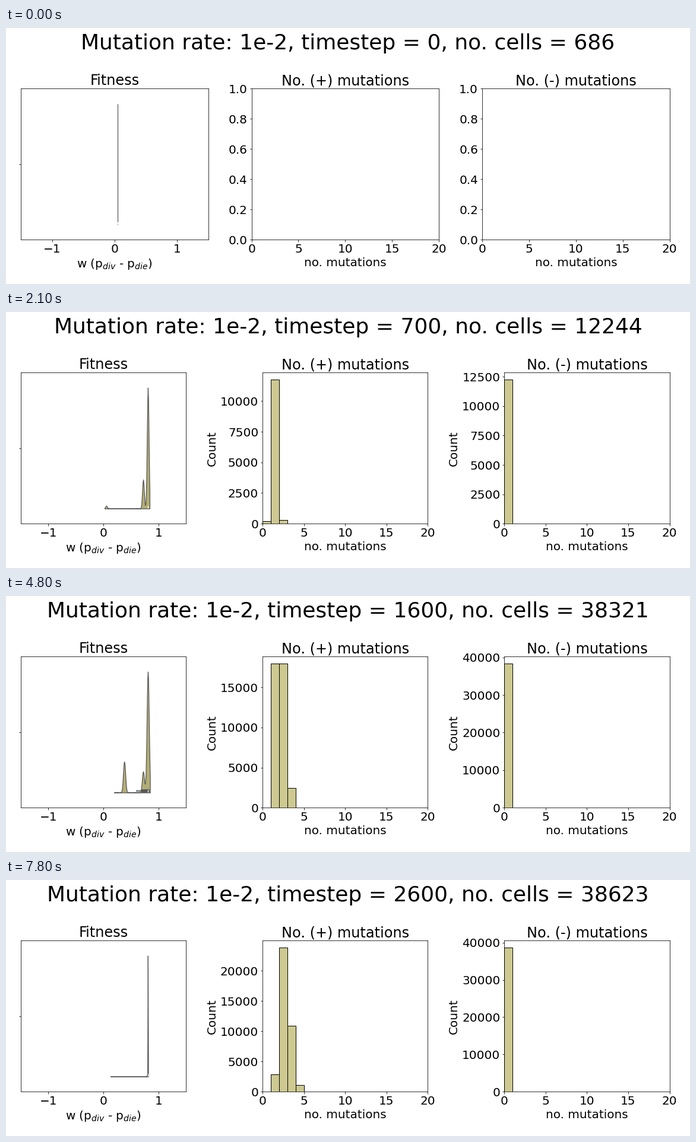
Animation of 1152x432 px, one loop 8 s. Source, as a matplotlib script:

```python
import numpy as np
import matplotlib.pyplot as plt
from matplotlib.animation import FuncAnimation

W, H, DPI = 1152, 432, 72
STEPS = 27
KHAKI, BODY, GRAY = (189 / 255, 183 / 255, 107 / 255, 0.75), "#b3ae75", "#595959"
LINE, BASE = 1.25, 0.4

plt.rcParams.update({"font.family": "DejaVu Sans", "font.size": 20})

WILD, BEST = 0.05, 0.806
FULL = 1900     # step at which the space is full and selection slows down
VISIBLE = 0.02  # smallest share at which a new mutation counts

# logistic takeover by cells with at least 2, 3 and 4 mutations: centre, width
WAVES = [(1570, 235), (2405, 300), (3000, 235)]

# clones that come and go: fitness, birth, peak, death, height next to the best
CLONES = [
    (0.72, 500, 1130, 1740, 0.76),
    (0.455, 1000, 1200, 1500, 0.515),
    (0.377, 1300, 1600, 1850, 0.257),
    (0.665, 1750, 1900, 2200, 0.054),
    (0.79, 2000, 2600, 3000, 0.016),
    (0.60, 600, 1200, 1900, 0.008),
]


def population(step):
    """Total number of cells and their counts by positive mutations."""
    n = np.interp(step, (0, 500, 900, 1200, 1600, 1900, 2600),
                  (686, 9889, 14599, 28860, 38321, 38663, 38623))
    wild = np.interp(step, (0, 500, 900, 1500), (686, 200, 225, 0))
    age = min(step, FULL) + 0.38 * max(step - FULL, 0)
    waves = [1 / (1 + np.exp((mid - age) / width)) for mid, width in WAVES]
    at_least = [n, n - wild, *(n * s if s > VISIBLE else 0 for s in waves), 0]
    return int(round(n)), -np.diff(at_least)


def fitness(step, wild_share):
    """Sorted fitness values and their weights."""
    share = np.array([1] + [np.interp(step, life, (0, top, 0))
                            for _, *life, top in CLONES])
    share *= (1 - wild_share) / share.sum()
    lowest = np.interp(step, (900, 1200, 1600, 1900, 2600),
                       (WILD, -0.195, 0.23, 0.145, 0.132))
    w = np.array([BEST, *(c[0] for c in CLONES), WILD, lowest])
    p = np.array([*share, wild_share, 0.0012 if step else 0])
    order = np.argsort(w)
    w, p = w[order], p[order]
    return w[p > 0], p[p > 0] / p.sum()


def quantile(w, p, q):
    return w[min(np.searchsorted(np.cumsum(p), q), len(w) - 1)]


def draw_violin(ax, w, p, n):
    if len(w) == 1:
        ax.vlines(w[0], -0.4, BASE, color=GRAY, lw=LINE)
    else:
        mean = (p * w).sum()
        bw = np.sqrt((p * (w - mean) ** 2).sum()) * n ** -0.2
        x = np.linspace(w[0] - 2 * bw, w[-1] + 2 * bw, 100)
        d = (p * np.exp(-0.5 * ((x[:, None] - w) / bw) ** 2)).sum(axis=1)
        ax.fill_between(x, BASE, BASE - 0.8 * d / d.max(),
                        facecolor=BODY, edgecolor=GRAY, lw=LINE)
    q1, med, q3 = (quantile(w, p, q) for q in (0.25, 0.5, 0.75))
    reach = 1.5 * (q3 - q1)
    inside = w[(w >= q1 - reach) & (w <= q3 + reach)]
    box = 4.5 * LINE
    y = BASE - box / 2 / 255
    if q3 > q1:
        ax.plot([inside[0], inside[-1]], [y, y], color=GRAY, lw=box / 3)
        ax.plot([q1, q3], [y, y], color=GRAY, lw=box)
    ax.plot(med, y, "|", color="white", ms=0.75 * box, mew=LINE)


def draw_bars(ax, counts):
    k = np.flatnonzero(counts >= 1)
    ax.bar(k, counts[k], width=1, align="edge",
           facecolor=KHAKI, edgecolor="black", lw=1)
    ax.set_ylim(0, 1.05 * counts.max())


def place_axes(gap):
    left, right, top, bottom = 25.1, 1117.6, 102.2, 357.2
    width = (right - left - 2 * gap) / 3
    for i, ax in enumerate(axes):
        x = left + i * (width + gap)
        ax.set_position([x / W, 1 - bottom / H, width / W, (bottom - top) / H])


def label_chars(ax):
    ticks = ax.get_yticks()
    return len(str(int(ticks[ticks <= ax.get_ylim()[1]].max())))


fig, axes = plt.subplots(1, 3, figsize=(W / DPI, H / DPI), dpi=DPI)
fit_ax, *hist_axes = axes
title = fig.suptitle("", fontsize=36)

fit_ax.set(title="Fitness", xlabel="w (p$_{div}$ - p$_{die}$)",
           xlim=(-1.5, 1.5), ylim=(0.5, -0.5), xticks=[-1, 0, 1])
fit_ax.set_yticks([0], [""])
for ax, sign in zip(hist_axes, "+-"):
    ax.set(title=f"No. ({sign}) mutations", xlabel="no. mutations",
           xlim=(0, 20), xticks=range(0, 21, 5))


def update(i):
    step = 100 * min(i // 3, STEPS - 1)
    n, counts = population(step)
    text = f"Mutation rate: 1e-2, timestep = {step}, no. cells = {n}"
    if title.get_text() == text:
        return
    title.set_text(text)
    for ax in axes:
        for art in [*ax.patches, *ax.lines, *ax.collections]:
            art.remove()

    draw_violin(fit_ax, *fitness(step, counts[0] / n), n)
    for ax, bars in zip(hist_axes, (counts, np.array([n]))):
        ax.set_ylabel("Count" if step else "")
        if step:
            draw_bars(ax, bars)
        else:
            ax.set_ylim(0, 1)
    if step:
        place_axes(65.3 + 12.725 * max(map(label_chars, hist_axes)))
    else:
        place_axes(73.1)


anim = FuncAnimation(fig, update, frames=80, interval=100, repeat=True,
                     repeat_delay=0, cache_frame_data=False)
plt.show()
```
